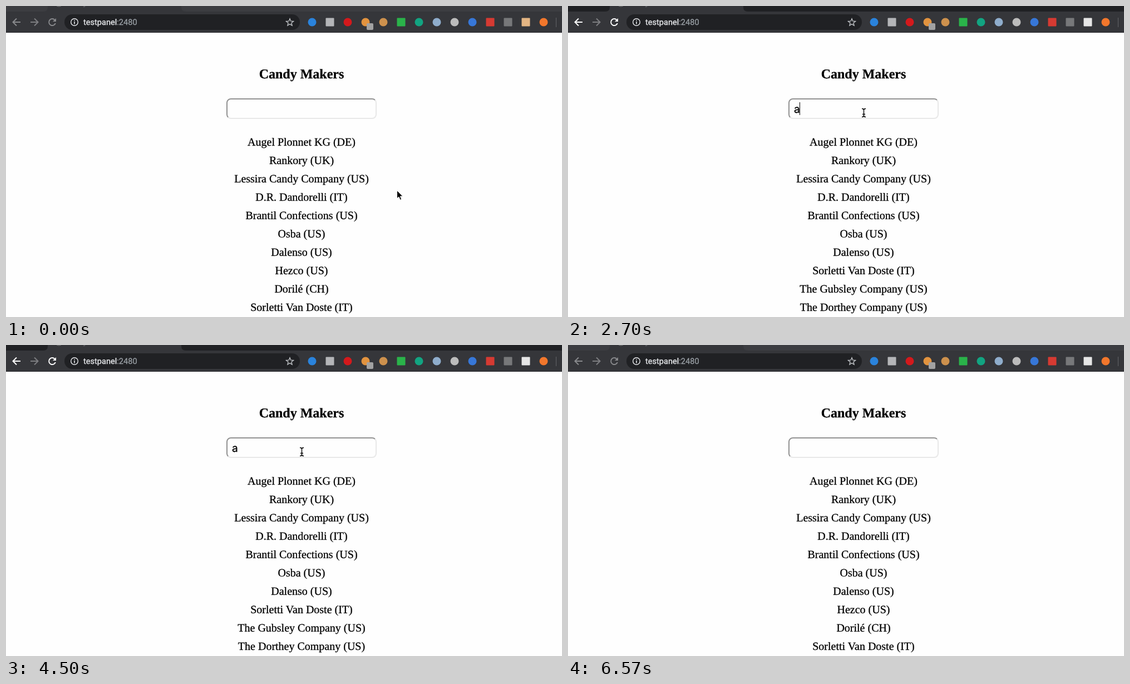
Animation of 999x559 px, one loop 6670 ms. Source, as an HTML page:

```html
<!DOCTYPE html>
<html lang="en">
<head>
<meta charset="utf-8">
<title>Candy Makers</title>
<style>
  html, body { margin: 0; width: 100%; height: 100%; overflow: hidden; background: #fefefe; }
  svg { display: block; }
  text { text-rendering: geometricPrecision; stroke: #000; stroke-width: .3; }
  .page { font: 20px "Liberation Serif", Times, serif; text-anchor: middle; }
  .page .title { font-size: 24px; font-weight: bold; }
  .address { font: 14.6px Roboto, sans-serif; fill: #e8eaed; stroke: #e8eaed; }
  .address tspan { fill: #9aa0a6; stroke: #9aa0a6; }
  .query { font: 19px Inter, sans-serif; }
  .line { fill: none; stroke-width: 2; }
</style>
</head>
<body>
<svg width="999" height="559" viewBox="0 0 999 559">
  <!-- browser bar -->
  <rect id="strip" width="999" height="11"/>
  <path d="M67 10Q75 10 75 2V0H315V2Q315 10 323 10V11H67Z" fill="#35363a"/>
  <path d="M91 0Q95 2 99 0M139 1.5Q141.5 1.5 142.5 0" fill="none" stroke="#77787b"/>
  <rect y="10" width="999" height="38" fill="#35363a"/>
  <rect y="47" width="999" height="1" fill="#27282b"/>
  <path class="line" d="M44 29H57M51 22.5L57.5 29L51 35.5" stroke="#7c7d80"/>
  <g id="nav">
    <path class="line" d="M26 29H13M19 22.5L12.5 29L19 35.5"/>
    <path class="line" d="M87.5 25A6 6 0 1 0 88.8 31"/>
    <path d="M90 22V28H84Z" stroke="none"/>
  </g>
  <rect x="105" y="15" width="423" height="28" rx="14" fill="#202124"/>
  <circle cx="123" cy="29" r="6.3" fill="none" stroke="#e8eaed" stroke-width="1.4"/>
  <path d="M123 28V32.5M123 25.2V26.8" stroke="#e8eaed" stroke-width="1.6"/>
  <text class="address" x="139" y="34">testpanel<tspan>:2480</tspan></text>
  <path id="star" fill="none" stroke="#c6c9cd" stroke-width="1.3"/>
  <g id="icons"></g>
  <rect x="648" y="31" width="12" height="12" rx="2" fill="#a2a2a2"/>
  <rect x="988" y="21" width="1" height="17" fill="#626367"/>

  <!-- page -->
  <g class="page">
    <text class="title" x="531" y="130">Candy Makers</text>
    <g id="list"></g>
  </g>
  <path class="line" stroke="#e8e8e8" d="M662.95 169.05A7 7 0 0 1 665 174V195A7 7 0 0 1 658 202H404A7 7 0 0 1 399.05 199.95"/>
  <path class="line" stroke="#929292" d="M399.05 199.95A7 7 0 0 1 397 195V174A7 7 0 0 1 404 167H658A7 7 0 0 1 662.95 169.05"/>
  <text id="query" class="query" x="406" y="192"></text>
  <rect id="caret" y="173" width="1" height="23"/>

  <!-- pointers -->
  <path id="arrow" d="M0 0V14.5L3.3 11.5L5.7 17L8.2 16L5.9 10.6H10.4Z" stroke="#fff"/>
  <g id="beam" fill="none">
    <path id="halo" stroke="#fff" stroke-width="2.6"/>
    <path id="stem" stroke="#000" stroke-width="1.4"/>
  </g>
</svg>
<script>
const LOOP = 6670;
const $ = id => document.getElementById(id);
const set = (el, attrs) => {
  for (const k in attrs) el.setAttribute(k, attrs[k]);
  return el;
};
const add = (parent, tag, attrs) =>
  set(parent.appendChild(document.createElementNS('http://www.w3.org/2000/svg', tag)), attrs);

const makers = [
  'Augel Plonnet KG (DE)', 'Rankory (UK)', 'Lessira Candy Company (US)',
  'D.R. Dandorelli (IT)', 'Brantil Confections (US)', 'Osba (US)',
  'Dalenso (US)', 'Hezco (US)', 'Dorilé (CH)', 'Sorletti Van Doste (IT)',
  'The Gubsley Company (US)', 'The Dorthey Company (US)'
];

// Each track lists [start time, value...] and holds until the next entry.
const windowActive = [[0, false], [600, true], [6570, false]];
const typed = [[0, ''], [2700, 'a'], [3150, 'au'], [3600, 'aug'], [4200, 'au'], [4500, 'a'], [4940, '']];
const caretOn = [[0, 0], [1650, 1], [2250, 0], [2700, 1], [4050, 0], [4640, 1], [5090, 0], [5540, 1], [6130, 0]];
const badgeColor = [[0, '#e3b583'], [2700, '#e6e6e6']];
const pointer = [
  [0, 'arrow', 702.5, 331.5], [900, 'arrow', 635, 302.5], [1050, 'beam', 550.5, 248],
  [1200, 'arrow', 537, 204.5], [1350, 'beam', 531.5, 192], [5540, 'beam', 648.5, 293],
  [5690, 'arrow', 866, 436.5], [5980, 'arrow', 945, 535], [6130, 'arrow', 951, 548.5],
  [6270, 'none', 0, 0]
];
const caretX = [406, 416, 427, 439];
const at = (track, t) => track.filter(step => step[0] <= t).pop().slice(1);

// Toolbar buttons, 32 px apart: shape and colour.
const icons = [
  ['o', '#2a83dc'], ['s', '#b4b5b8'], ['o', '#d4191c'], ['o', '#e2933f'], ['o', '#cd914d'],
  ['s', '#2ab34a'], ['o', '#12a481'], ['o', '#8fadcc'], ['o', '#bcbcbc'], ['o', '#3777d8'],
  ['s', '#d63a32'], ['s', '#77787a'], ['s', '#e3b583'], ['o', '#f2772c']
].map(([shape, fill], i) => {
  const x = 550 + 32 * i;
  return shape === 'o'
    ? add($('icons'), 'circle', { cx: x, cy: 29, r: 7.5, fill })
    : add($('icons'), 'rect', { x: x - 7.5, y: 21.5, width: 15, height: 15, rx: 1, fill });
});

const starPoints = Array.from({ length: 10 }, (_, i) => {
  const r = i % 2 ? 3 : 6.9, a = i * Math.PI / 5;
  return (510 + r * Math.sin(a)).toFixed(2) + ' ' + (29.6 - r * Math.cos(a)).toFixed(2);
});
set($('star'), { d: 'M' + starPoints.join('L') + 'Z' });

const beamShape = 'M-3.5 -7.5Q0 -7.5 0 -5V5Q0 7.5 -3.5 7.5M3.5 -7.5Q0 -7.5 0 -5M0 5Q0 7.5 3.5 7.5M-2.5 2.5H2.5';
for (const id of ['halo', 'stem']) set($(id), { d: beamShape });

let shown = null;
function showList(query) {
  if (query === shown) return;
  shown = query;
  $('query').textContent = query;
  $('list').replaceChildren();
  makers.filter(name => name.toLowerCase().includes(query)).forEach((name, i) => {
    add($('list'), 'text', { x: 531, y: 251 + 33 * i }).textContent = name;
  });
}

function draw(now) {
  const t = now % LOOP;
  const [active] = at(windowActive, t);
  const [query] = at(typed, t);
  const [kind, x, y] = at(pointer, t);
  const navColor = active ? '#fff' : '#88898c';
  set($('strip'), { fill: active ? '#202124' : '#3c3d41' });
  set($('nav'), { fill: navColor, stroke: navColor });
  set(icons[12], { fill: at(badgeColor, t)[0] });
  showList(query);
  set($('caret'), { x: caretX[query.length], opacity: at(caretOn, t)[0] });
  for (const id of ['arrow', 'beam']) {
    set($(id), { transform: `translate(${x} ${y})`, visibility: id === kind ? 'visible' : 'hidden' });
  }
  requestAnimationFrame(draw);
}
draw(performance.now());
</script>
</body>
</html>
```
